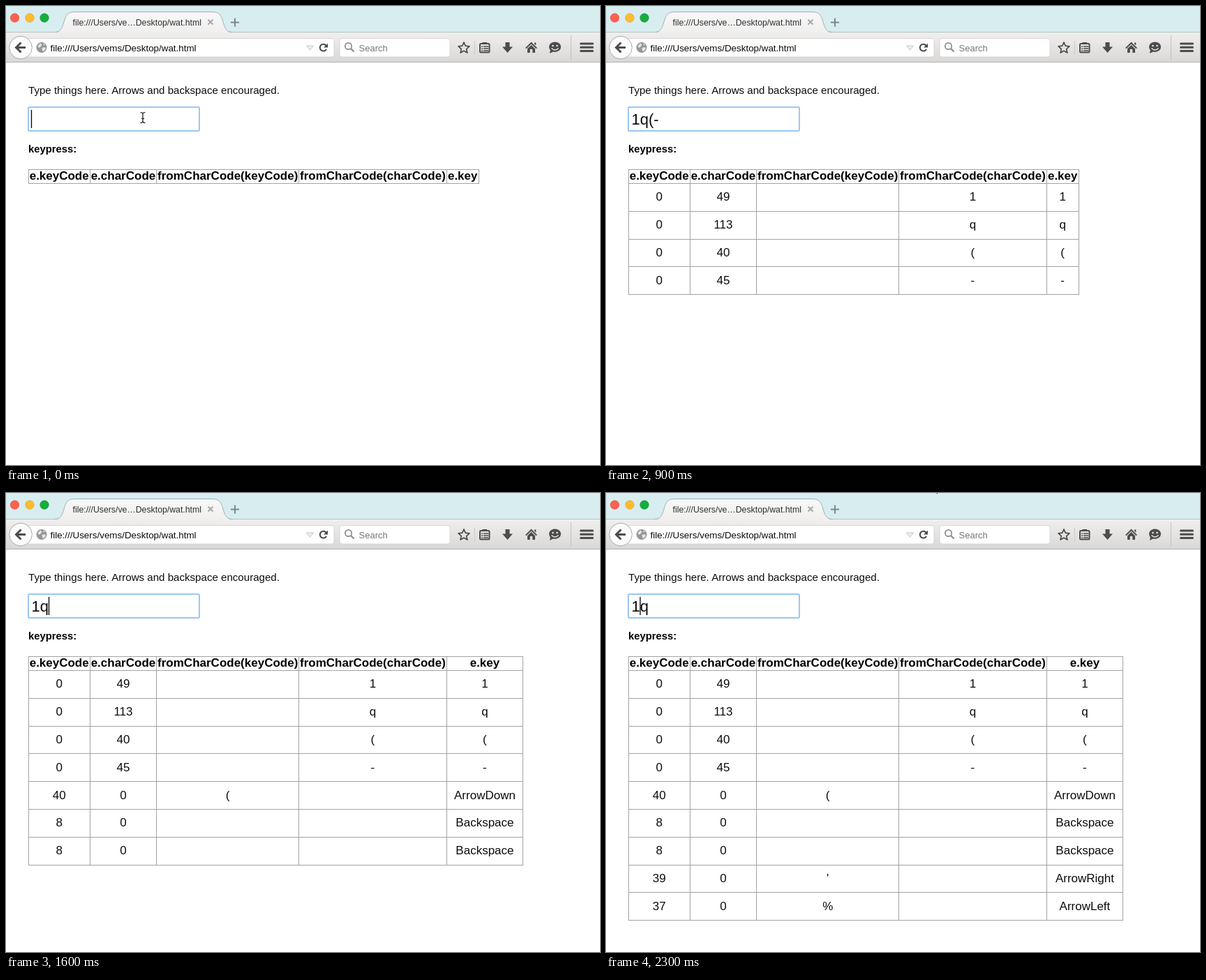
An HTML page that plays this animation: 851x658 px, repeating every 2.4 s.

```html
<!DOCTYPE html>
<html lang="en">
<head>
<meta charset="utf-8">
<title>keypress</title>
<style>
  html, body { margin: 0; width: 100%; height: 100%; overflow: hidden; background: #fff; }
  svg { display: block; width: 851px; height: 658px; }
  text { font-family: "Liberation Sans", Arial, sans-serif; fill: #0c0c0c; white-space: pre; }
  .bold { font-weight: 700; fill: #000; }
  .mid { text-anchor: middle; }
  .cell { font-size: 17px; }
  .icon { fill: #4c4c4c; }
  .line { fill: none; stroke: #4c4c4c; stroke-width: 2; }
  #grid { fill: none; stroke: #a3a3a3; }
</style>
</head>
<body>
<svg viewBox="0 0 851 658">
  <defs>
    <linearGradient id="bar" x2="0" y2="1">
      <stop stop-color="#f0efee"/><stop offset="1" stop-color="#dad8d7"/>
    </linearGradient>
    <linearGradient id="tab" x2="0" y2="1">
      <stop stop-color="#f8f8f8"/><stop offset="1" stop-color="#f0efee"/>
    </linearGradient>
  </defs>

  <!-- Title bar and tab -->
  <rect width="851" height="38" fill="#d8edf0"/>
  <rect y="38" width="851" height="42" fill="url(#bar)"/>
  <path d="M0 37.5H851" stroke="#b4c3c6"/>
  <path d="M0 80.5H851" stroke="#b5b4b3"/>
  <path d="M70 38.5C78 38 80 33 83 23C86 12 89 8.500 99 8.500H295C305 8.500 308 12 311 23C314 33 316 38 324 38.500Z" fill="url(#tab)"/>
  <path d="M70 37.500C78 37 80 33 83 23C86 12 89 8.500 99 8.500H295C305 8.500 308 12 311 23C314 33 316 37 324 37.500" fill="none" stroke="#a2b0b3"/>
  <circle cx="12.500" cy="17" r="6.200" fill="#fc6150" stroke="#e4503f" stroke-width=".7"/>
  <circle cx="34" cy="17" r="6.200" fill="#fdbc2f" stroke="#e0a124" stroke-width=".7"/>
  <circle cx="55" cy="17" r="6.200" fill="#17ad3e" stroke="#109735" stroke-width=".7"/>
  <text x="95.500" y="28" font-size="12.300" style="fill:#303030">file:///Users/ve…Desktop/wat.html</text>
  <path d="M289.500 19.500l7 7m0-7l-7 7" stroke="#aaa" stroke-width="2.200"/>
  <path d="M322 23.500h12m-6-6v12" stroke="#7b878a" stroke-width="2"/>

  <!-- Address and search fields -->
  <rect x="30" y="46.500" width="440" height="26.500" rx="3" fill="#fff" stroke="#d1d0cf" stroke-width=".8"/>
  <circle cx="21" cy="59.500" r="16.300" fill="#fcfcfc" stroke="#aaa9a8"/>
  <path d="M28 59.500H15.500M21.500 52.500L14.500 59.500L21.500 66.500" class="line" stroke-width="3" style="stroke-width:3"/>
  <circle cx="51" cy="59.500" r="7.500" fill="#969696"/>
  <path d="M45.500 57l4-3.500l2 2l-2 3l-2.500 1.500zM51.500 60l4-1l1.500 2l-3 4l-2-1zM53 53.500l3 2l-2 1z" fill="#e6e6e6"/>
  <text x="63.500" y="64.700" font-size="13.400">file:///Users/vems/Desktop/wat.html</text>
  <path d="M430.500 57H440.500L435.500 63.500Z" fill="#eee" stroke="#c8c8c8"/>
  <path d="M458.500 56.500A4.900 4.900 0 1 0 459 62" class="line"/>
  <path d="M461 53.500V59.500H455Z" class="icon"/>
  <rect x="478" y="46.500" width="158" height="26.500" rx="3" fill="#fff" stroke="#d1d0cf" stroke-width=".8"/>
  <circle cx="490.500" cy="57.500" r="4.700" fill="none" stroke="#8d8d8d" stroke-width="1.700"/>
  <path d="M494 61l4.500 4.500" stroke="#8d8d8d" stroke-width="2.300"/>
  <text x="505.500" y="64.700" font-size="13" style="fill:#777">Search</text>

  <!-- Toolbar buttons -->
  <path d="M656 52l2.300 5.200l5.600.6l-4.200 3.800l1.200 5.500l-4.900-2.800l-4.900 2.800l1.200-5.500l-4.200-3.800l5.600-.6z" class="line" style="stroke-width:1.700" stroke-linejoin="round"/>
  <path d="M671.500 50V69" stroke="#cbc9c8"/>
  <rect x="679" y="54" width="13.500" height="12.500" rx="1.500" class="line"/>
  <path d="M682.500 52h6.500v3h-6.500z" class="icon"/>
  <path d="M681 58h2m1 0h7m-10 3h2m1 0h7m-10 3h2m1 0h7" class="line" style="stroke-width:1.400"/>
  <path d="M715.500 52h6v6.500h4.500L718.500 67L711 58.500h4.500z" class="icon"/>
  <path d="M752.500 51.500l8.500 8.500l-1.500 1.200l-7-6.700l-7 6.700l-1.500-1.200zM757 52.500h2.300v4l-2.300-2zM752.500 56l5.500 5.300V67h-3.700v-5h-3.600v5H747v-5.700z" class="icon"/>
  <ellipse cx="786.500" cy="58.700" rx="8.500" ry="7.200" class="icon"/>
  <path d="M780 62l-1 6l6-3z" class="icon"/>
  <circle cx="783.500" cy="57" r="1.300" fill="#e8e7e6"/>
  <circle cx="789.500" cy="57" r="1.300" fill="#e8e7e6"/>
  <path d="M781.500 60.500q5 5 10 0" fill="none" stroke="#e8e7e6" stroke-width="1.400"/>
  <path d="M809.500 42V77" stroke="#c3c1c0"/>
  <path d="M823.500 54h17m-17 5.300h17m-17 5.300h17" class="line" style="stroke-width:3" stroke-linecap="round"/>

  <!-- Page -->
  <text x="32" y="126" font-size="15.100">Type things here. Arrows and backspace encouraged.</text>
  <rect x="32" y="145" width="245" height="34" rx="1.500" fill="#fff" stroke="#9ac7f3" stroke-width="2"/>
  <text id="typed" x="36.500" y="170" font-size="22"></text>
  <path id="caret" d="M.5 149V175" stroke="#000" stroke-width="1.300"/>
  <text x="32" y="210" font-size="14.800" class="bold">keypress:</text>
  <path id="grid"/>
  <g id="cells"></g>

  <!-- Pointers -->
  <path id="beam" d="M192.500 152.500q3.500 0 3.500 2.500q0-2.500 3.500-2.500M196 154.500V165.500M192.500 167.500q3.500 0 3.500-2.500q0 2.500 3.500 2.500M194 161.500h4" fill="none" stroke="#111" stroke-width="1.200"/>
  <path id="arrow" d="M0 0V15L3.500 12L6 17.500L8 16.500L5.700 11.300H10.500Z" fill="#111" stroke="#fff" stroke-width=".9"/>
</svg>
<script>
const LOOP = 2400;
const heads = ["e.keyCode", "e.charCode", "fromCharCode(keyCode)", "fromCharCode(charCode)", "e.key"];
const presses = [
  [0, 49, "", "1", "1"],
  [0, 113, "", "q", "q"],
  [0, 40, "", "(", "("],
  [0, 45, "", "-", "-"],
  [40, 0, "(", "", "ArrowDown"],
  [8, 0, "", "", "Backspace"],
  [8, 0, "", "", "Backspace"],
  [39, 0, "'", "", "ArrowRight"],
  [37, 0, "%", "", "ArrowLeft"]
];
const pressTimes = [200, 300, 600, 700, 1000, 1500, 1600, 1800, 1900];
const typed = ["", "1", "1q", "1q(", "1q(-", "1q(-", "1q(", "1q", "1q", "1q"];
const caretX = [36, 48.5, 61, 66.5, 75, 75, 66.5, 61, 61, 48.5];
const caretOff = [[100, 200], [500, 600], [900, 1100], [1200, 1400], [2100, 2300]];
const left = [32, 120, 215.5, 419.5, 631];

const el = id => document.getElementById(id);
const show = (node, on) => node.setAttribute("visibility", on ? "visible" : "hidden");
const rowY = n => Math.round(254 + 39.8 * n) + 0.5;

function addText(parent, str, x, y, cls) {
  const t = document.createElementNS("http://www.w3.org/2000/svg", "text");
  t.setAttribute("x", x);
  t.setAttribute("y", y);
  t.setAttribute("class", cls);
  t.textContent = str;
  parent.append(t);
}

function drawTable(n) {
  const right = n > 4 ? 740.5 : 677;
  const edges = [...left, right];
  const bottom = rowY(n);
  let d = `M32 234.5H${right}`;
  for (let i = 0; i <= n; i++) d += `M32 ${rowY(i)}H${right}`;
  for (const x of edges) d += `M${Math.floor(x) + 0.5} 234V${bottom + 0.5}`;
  el("grid").setAttribute("d", d);

  const cells = el("cells");
  cells.replaceChildren();
  const addRow = (row, y, cls) => row.forEach((v, i) =>
    addText(cells, v, (edges[i] + edges[i + 1]) / 2 + 0.2, y, cls));
  addRow(heads, 249, "cell mid bold");
  presses.slice(0, n).forEach((row, i) => addRow(row, 279.3 + 39.8 * i, "cell mid"));
}

let drawn = -1;
function render(now) {
  const t = now % LOOP;
  const n = pressTimes.filter(p => p <= t).length;
  if (n !== drawn) {
    drawTable(n);
    el("typed").textContent = typed[n];
    el("caret").setAttribute("transform", `translate(${caretX[n]})`);
    drawn = n;
  }
  show(el("caret"), !caretOff.some(([a, b]) => t >= a && t < b));
  show(el("beam"), t < 200);
  show(el("arrow"), t >= 2200);
  el("arrow").setAttribute("transform", t < 2300 ? "translate(490 44)" : "translate(468 -15.5)");
}

const start = performance.now();
function tick() {
  render(performance.now() - start);
  requestAnimationFrame(tick);
}
tick();
</script>
</body>
</html>
```
